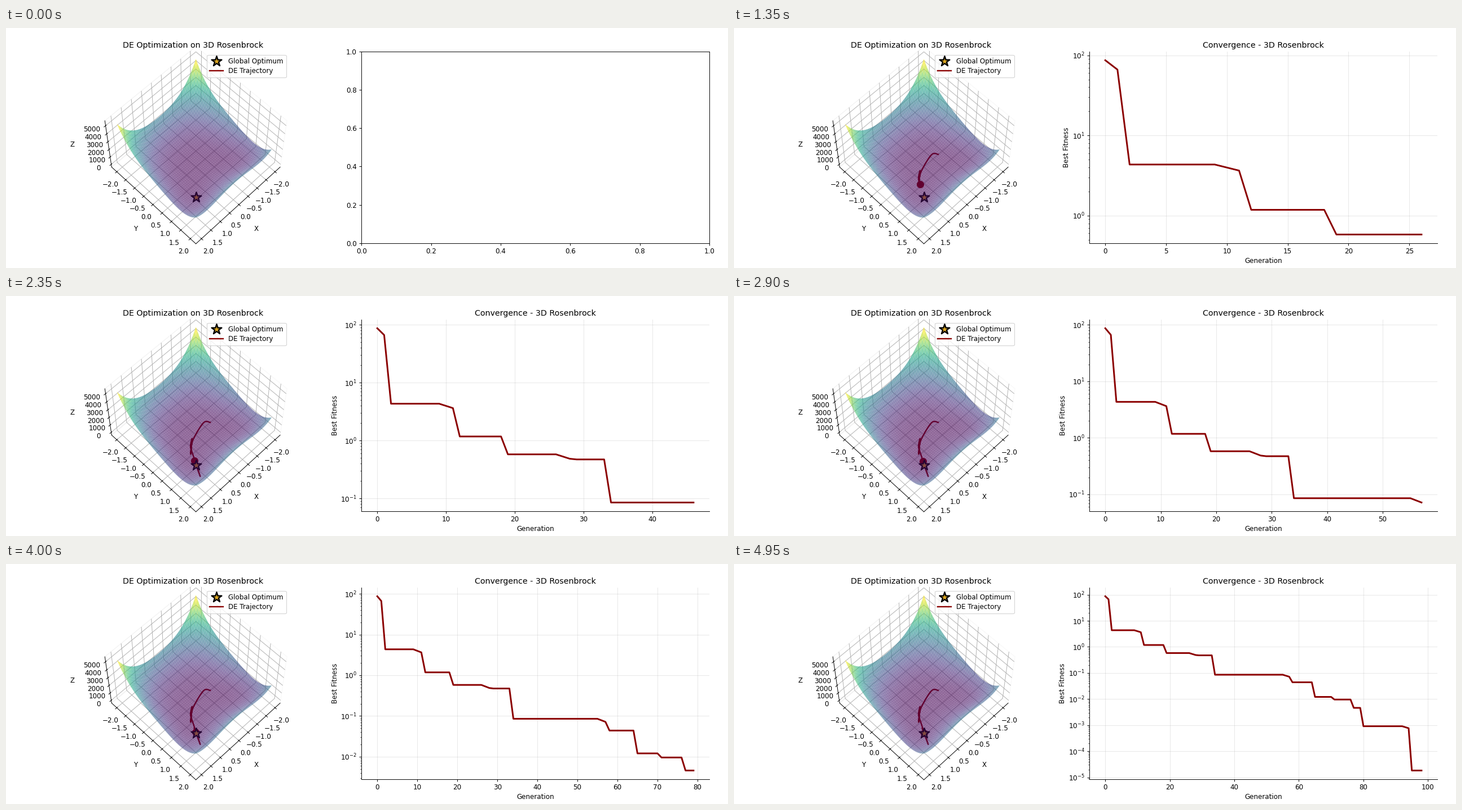
Write a matplotlib script that moves like this. It is 1280 px wide and 427 px high and loops after 5 s.

```python
import numpy as np
import matplotlib.pyplot as plt
from matplotlib.animation import FuncAnimation

W, H = 1280, 427
DPI = 256 / 3
FRAMES = 100
RED = "darkred"

# Generation -> best fitness at the main improvements
DROPS = {0: 87, 1: 66.5, 2: 4.34, 12: 1.18, 19: 0.58, 29: 0.474, 34: 0.0856,
         58: 0.044, 65: 0.0121, 71: 0.0096, 77: 0.0046, 80: 9.1e-4,
         95: 1.83e-5}
CREEP = 0.84  # slow gain at the end of a long plateau

# Generation, x, y of the best solution until it settles near the optimum
SPOTS = [(0, -0.70, 0.08), (1, -0.50, -0.09), (2, 0.34, 0.17),
         (2, 0.81, 0.53), (11, 0.30, 0.10), (12, 0.56, 0.27),
         (19, 0.72, 0.52), (29, 1.22, 1.45), (34, 0.91, 0.84)]
SETTLED = SPOTS[-1][0]
STEPS = 14


def rosenbrock(x, y, z=0.0):
    return (100 * (y - x**2)**2 + (1 - x)**2
            + 100 * (z - y**2)**2 + (1 - y)**2)


def staircase(gens):
    starts = np.array(list(DROPS))
    values = np.array(list(DROPS.values()))
    fit = values[np.searchsorted(starts, gens, side="right") - 1]
    for a, b in zip(starts, starts[1:]):
        if b - a >= 10:
            fit[b - 2:b] *= CREEP ** np.array([0.5, 1])
    return fit


def settle(fit):
    """Near the optimum, distance shrinks with the root of the fitness."""
    offset = np.array(SPOTS[-1][1:]) - 1
    return 1 + offset * np.sqrt(fit / DROPS[SETTLED])[:, None]


def smooth(pts, steps):
    """Catmull-Rom curve through pts, with `steps` samples per segment."""
    p = np.vstack([pts[:1], pts, pts[-1:]])
    t = np.linspace(0, 1, steps, endpoint=False)[:, None]
    parts = []
    for a, b, c, d in zip(p, p[1:], p[2:], p[3:]):
        parts.append(0.5 * (2 * b + (c - a) * t
                            + (2 * a - 5 * b + 4 * c - d) * t**2
                            + (3 * b - a - 3 * c + d) * t**3))
    return np.vstack(parts + [pts[-1:]])


def pixel_rect(x0, y0, x1, y1):
    return [x0 / W, 1 - y1 / H, (x1 - x0) / W, (y1 - y0) / H]


gens = np.arange(FRAMES - 1)
fitness = staircase(gens)
late = gens > SETTLED
spots = np.array(SPOTS)
node_gens = np.concatenate([spots[:, 0], gens[late]])
path = smooth(np.vstack([spots[:, 1:], settle(fitness[late])]), STEPS)

fig = plt.figure(figsize=(15, H * 3 / 256), dpi=DPI)
ax3d = fig.add_axes(pixel_rect(23.7, 41.9, 640.4, 382.9), projection="3d",
                    computed_zorder=False)
ax = fig.add_axes(pixel_rect(630.2, 41.9, 1246.9, 382.9))

s = np.linspace(-2, 2, 100)
X, Y = np.meshgrid(s, s)
Z = rosenbrock(X, Y)
surf = ax3d.plot_surface(X, Y, Z, cmap="viridis", alpha=0.6, zorder=4)
ax3d.scatter([1], [1], [0], marker="*", s=250, c="goldenrod",
             edgecolors="black", linewidths=2, depthshade=False, zorder=3,
             label="Global Optimum")
trail, = ax3d.plot([], [], [], color=RED, lw=2, zorder=2,
                   label="DE Trajectory")
dot, = ax3d.plot([], [], [], "o", color=RED, ms=10, zorder=2)

# 5 % data margin, then the usual 1/48 view margin on each side
grow = 1.1 * 25 / 24
lim, top = 2 * grow, Z.max()
pad = top * (grow - 1) / 2
ax3d.set(xlim=(-lim, lim), ylim=(-lim, lim), zlim=(-pad, top + pad))
ax3d.set_title("DE Optimization on 3D Rosenbrock")
ax3d.view_init(elev=60, azim=45)
for name, axis in zip("XYZ", (ax3d.xaxis, ax3d.yaxis, ax3d.zaxis)):
    axis.set_label_text(name)
    axis.labelpad = 10
    axis.pane.fill = False
ax3d.legend(loc="upper right", labelspacing=0.41)

# The camera is fixed, so the surface is projected only once
fig.canvas.draw()
surf.do_3d_projection = lambda: 0


def set_path(line, pts):
    line.set_data_3d(pts[:, 0], pts[:, 1], np.zeros(len(pts)))


def update(frame):
    ax.clear()
    ax.spines[["top", "right"]].set_visible(frame == 0)
    if frame == 0:
        set_path(trail, path[:0])
        set_path(dot, path[:0])
        return

    last = np.searchsorted(node_gens, frame - 1, side="right") - 1
    end = last * STEPS
    set_path(trail, path[:end + 1])
    set_path(dot, path[end:end + 1])

    ax.semilogy(gens[:frame], fitness[:frame], color=RED, lw=2.5)
    ax.set_title("Convergence - 3D Rosenbrock")
    ax.set_xlabel("Generation", labelpad=3)
    ax.set_ylabel("Best Fitness", labelpad=3)
    ax.grid(True, alpha=0.3)


anim = FuncAnimation(fig, update, frames=FRAMES, init_func=lambda: update(0),
                     interval=50, repeat=True, repeat_delay=0, blit=False)
plt.show()
```
